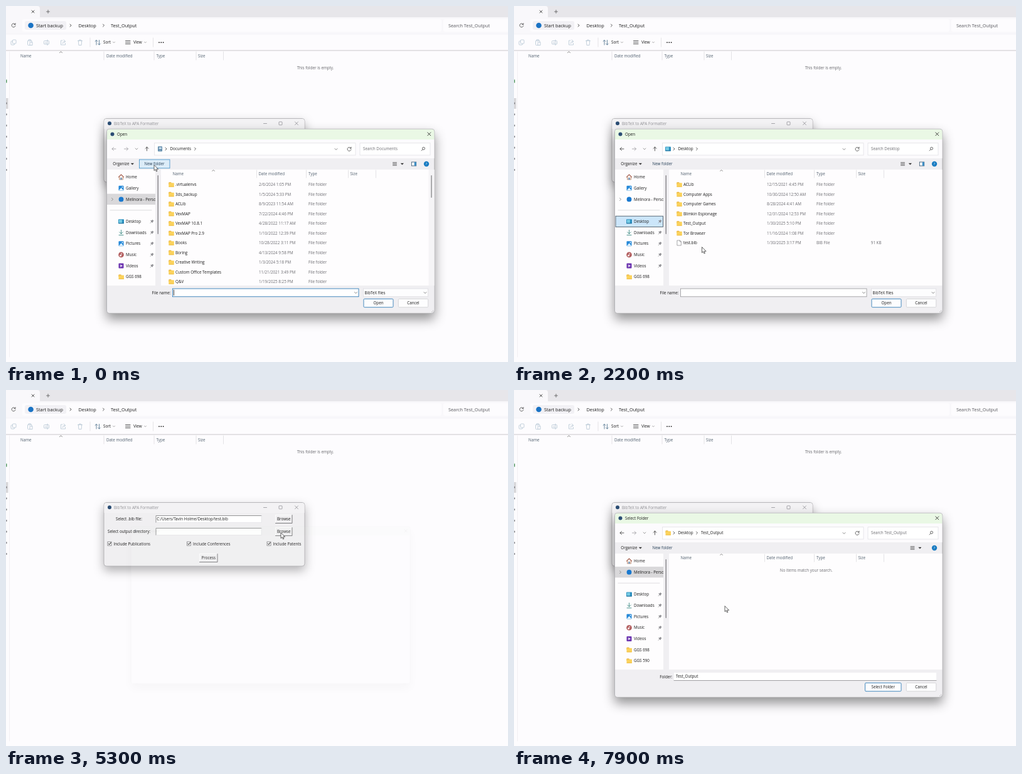
Animation, 800 px wide and 568 px high, one loop 8 s. Source, as an HTML page:

```html
<!DOCTYPE html>
<html lang="en">
<head>
<meta charset="utf-8">
<title>BibTeX to APA Formatter</title>
<style>
html, body { margin: 0; width: 100%; height: 100%; overflow: hidden; background: #fdfcfe; }
svg { display: block; width: 800px; height: 568px; }
text { font-family: "Open Sans", "Noto Sans", sans-serif; white-space: pre; }
.shadow { filter: drop-shadow(0 9px 9px rgba(0,0,0,.42)); }
.soft { filter: drop-shadow(0 7px 8px rgba(0,0,0,.3)); }
</style>
</head>
<body>
<svg viewBox="0 0 800 568">
  <defs><clipPath id="nav"><rect x="161" y="261" width="77" height="185"/></clipPath></defs>
  <g id="explorer"></g><g id="app"></g><g id="dialog"></g><g id="pointer"></g>
</svg>
<script>
const LOOP = 8000, STEP = 100;
const INK = '#1b1b1b', GRAY = '#6d6d72', BLUE = '#1a6fb0';
const byId = id => document.getElementById(id);

// Drawing helpers; text y is the optical middle of the line
const text = (x, y, s, fill = INK, size = 6.27, anchor = 'start') =>
  `<text x="${x}" y="${y + size * .35}" font-size="${size}" fill="${fill}" text-anchor="${anchor}">${s.replace(/&/g, '&amp;')}</text>`;
const mid = (x, y, s, fill, size) => text(x, y, s, fill, size, 'middle');
const rect = (x, y, w, h, fill, stroke = 'none', r = 0, extra = '') =>
  `<rect x="${x}" y="${y}" width="${w}" height="${h}" fill="${fill}" stroke="${stroke}" stroke-width=".8" rx="${r}" ${extra}/>`;
const line = (d, stroke = INK, w = .8, fill = 'none') =>
  `<path d="${d}" fill="${fill}" stroke="${stroke}" stroke-width="${w}" stroke-linecap="round" stroke-linejoin="round"/>`;
const dot = (x, y, r, fill) => `<circle cx="${x}" cy="${y}" r="${r}" fill="${fill}"/>`;
const vline = (x, y1, y2, c = '#dedce0') => line(`M${x} ${y1}V${y2}`, c);
const hline = (x1, x2, y, c = '#dedce0', w) => line(`M${x1} ${y}H${x2}`, c, w);
const right = (x, y, c = '#333') => line(`M${x - 1} ${y - 2}l2 2l-2 2`, c, .8);
const down = (x, y, c = '#555', s = 2) => line(`M${x - s} ${y - s / 2}l${s} ${s}l${s} ${-s}`, c, .7);
const caretDown = (x, y) => line(`M${x - 2} ${y - 1}h4l-2 2z`, '#222', .4, '#222');
const cross = (x, y, c = INK, s = 2.5) => line(`M${x - s} ${y - s}l${2 * s} ${2 * s}m0 ${-2 * s}l${-2 * s} ${2 * s}`, c, .8);
const arrow = (x, y, turn, c) => `<g transform="translate(${x} ${y}) rotate(${turn})">${line('M3 0H-3M-.5 -2.5L-3 0L-.5 2.5', c)}</g>`;
const reload = (x, y) => line(`M${x + 2.7} ${y - 1.6}A3 3 0 1 0 ${x + 3} ${y + .6}M${x + 3} ${y - 3.4}v2h-2`, '#444', .8);

const icons = {
  folder: (x, y) => rect(x - 4, y - 3.8, 4.2, 4, '#e3a92f', 'none', .7) + rect(x - 4, y - 2.8, 8.5, 6.6, '#fbd25c', 'none', .8) + hline(x - 3.6, x + 4, y + 3.2, '#eab840', .7),
  file: (x, y) => line(`M${x - 3} ${y - 4}h4l2 2v6h-6zM${x + 1} ${y - 4}v2h2`, '#858589', .7, '#fff'),
  home: (x, y) => line(`M${x - 3} ${y}v4h6v-4`, '#b98a71', .8, '#f1dfd4') + line(`M${x - 4} ${y}l4 -4l4 4`, '#a7604f', 1.1) + rect(x - 1, y + 1.2, 2, 2.8, '#4d86b8'),
  pictures: (x, y) => rect(x - 4, y - 4, 8, 8, '#2488d8', 'none', 1) + line(`M${x - 3.5} ${y + 3.5}l3.5 -4l3.5 4z`, '#fff', .3, '#e8f6ff') + dot(x + 2, y - 1.8, .9, '#fff'),
  cloud: (x, y) => dot(x, y, 3.9, '#1a79cf'),
  desktop: (x, y) => rect(x - 4.5, y - 3.5, 9, 7, '#2c8fbf', 'none', .8) + rect(x - 3.6, y - 2.7, 5, 5, '#76cbe4') + hline(x - 4, x + 4, y + 2.8, '#1d6792', .8),
  downloads: (x, y) => line(`M${x} ${y - 4}v6m-2.7 -2.7l2.7 2.7l2.7 -2.7M${x - 3.5} ${y + 4}h7`, '#3c8a83', .9),
  music: (x, y) => dot(x, y, 4.3, '#b35f60') + dot(x - 1, y + 1.4, 1.3, '#fff') + line(`M${x + .1} ${y + 1.3}v-3.6l1.5 .8`, '#fff', .7),
  videos: (x, y) => rect(x - 4, y - 4, 8, 8, '#6c35b0', 'none', 1) + line(`M${x - 1} ${y - 1.7}l3 1.7l-3 1.7z`, '#fff', .4, '#fff'),
  documents: (x, y) => rect(x - 3.5, y - 4, 7, 8, '#5d88a8', 'none', .8) + rect(x - 2, y - 2.5, 4.5, 2.5, '#cfe4f1') + hline(x - 2, x + 2, y + 2, '#d8e8f2', .6),
};
const pin = (x, y) => line(`M${x - 2.3} ${y + 2.4}l2 -2M${x - 1.6} ${y - .9}l2.5 2.5l.4 -1.6l1.2 -1l-1.6 -1.6l-1 1.2z`, '#77777c', .7, '#99999e');

const PLACES = [['desktop', 'Desktop'], ['downloads', 'Downloads'], ['pictures', 'Pictures'], ['music', 'Music'], ['videos', 'Videos']];
const DOCUMENTS = [
  ['.virtualenvs', '2/6/2024 1:05 PM'], ['3ds_backup', '1/5/2024 5:33 PM'], ['ACLib', '8/9/2023 11:54 AM'],
  ['VexMAP', '7/22/2024 4:46 PM'], ['VexMAP 10.8.1', '4/28/2022 11:17 AM'], ['VexMAP Pro 2.9', '1/10/2022 12:39 PM'],
  ['Books', '10/28/2022 3:11 PM'], ['Boring', '4/13/2024 9:58 PM'], ['Creative Writing', '1/3/2024 5:18 PM'],
  ['Custom Office Templates', '11/21/2021 3:49 PM'], ['Q&V', '1/19/2025 8:25 PM']];
const DESKTOP = [
  ['ACLib', '12/15/2021 4:45 PM'], ['Computer Apps', '10/30/2024 12:50 AM'], ['Computer Games', '8/28/2024 4:41 AM'],
  ['Blimkin Espionage', '12/31/2024 12:53 PM'], ['Test_Output', '1/30/2025 5:10 PM'], ['Tor Browser', '11/16/2024 1:08 PM']];
const BIB = ['test.bib', '1/30/2025 3:17 PM', 'BIB File', '91 KB'];

function explorer() {
  const faint = '#b5c6d4', head = '#51606e';
  let s = rect(0, 0, 800, 568, '#fdfcfe') + rect(0, 0, 800, 18, '#e7e6ea') + rect(-6, 0, 60, 22, '#f9f8fb', 'none', 4)
    + rect(0, 18, 800, 27, '#f9f8fb') + rect(26, 21, 668, 20, '#fdfcfe', 'none', 3) + rect(697, 21, 110, 20, '#fdfcfe', 'none', 3)
    + cross(43, 9, '#333', 2) + line('M64.5 9h5M67 6.5v5', '#444', .7)
    + reload(12, 31) + rect(30, 24, 66, 14, '#f2f1f5', 'none', 3) + dot(39.5, 31, 4.3, '#1a73c4')
    + text(48, 31, 'Start backup', INK, 7.3) + right(103, 31) + text(115.5, 31, 'Desktop', INK, 7.3) + right(155.5, 31)
    + text(167, 31, 'Test_Output', INK, 7.3) + text(705, 31, 'Search Test_Output', '#55555a', 7.3)
    + hline(0, 800, 45, '#efedf1', .6) + hline(0, 800, 71, '#c9c8cb', 1.2);
  s += rect(8, 56, 5.5, 6, 'none', faint, 1) + rect(10.5, 54, 5.5, 6, '#fdfcfe', faint, 1)
    + rect(34.5, 55, 6.5, 7.5, 'none', faint, 1) + rect(36.3, 53.8, 3, 2, '#fdfcfe', faint) + rect(38, 58, 4, 4.5, '#fdfcfe', faint)
    + rect(60.5, 55.5, 8, 5.5, 'none', faint, 1) + vline(66, 54, 62.5, faint) + mid(63.4, 58.2, 'A', faint, 4)
    + line('M90 55h-2.5v7h7v-2.5M90 60q0 -3.5 4 -3.5M92 54l2.8 2.5l-2.8 2.5', faint)
    + line('M114.5 55.5h7M116.5 55.5v-1.5h3v1.5M115.3 55.5l.6 7h4.2l.6 -7', faint);
  s += vline(134, 51, 65) + line('M144 62v-7.5m-2 2l2 -2l2 2M148.5 54.5v7.5m-2 -2l2 2l2 -2', '#456a86', .8)
    + text(155, 58, 'Sort') + down(172, 58, '#888', 1.5);
  [55.5, 58, 60.5].forEach(y => s += hline(190.5, 198, y, '#333', .8));
  s += text(203, 58, 'View') + down(222, 58, '#888', 1.5) + vline(234.5, 51, 65);
  [244, 247.3, 250.6].forEach(x => s += dot(x, 58.2, .9, '#222'));
  s += line('M85.5 74.5l2 -1.7l2 1.7', '#555', .7);
  [[23, 'Name'], [160, 'Date modified'], [239.5, 'Type'], [306, 'Size']].forEach(([x, n]) => s += text(x, 79.5, n, head));
  [156, 236, 303, 346.5].forEach(x => s += vline(x, 73, 86));
  s += vline(5.5, 73, 560, '#efedf0') + mid(493, 99, 'This folder is empty.', '#66666b')
    + rect(0, 147, 3.5, 17, '#d8d7da') + rect(0, 117.5, 1.5, 5, '#5f9e6c');
  for (let i = 0; i < 7; i++) s += rect(0, 153.8 + i * 17.7, 1.6, 3, '#8d8d92', 'none', .7);
  return s;
}

const bevel = (x, y, w, h, label, sunk) => rect(x, y, w, h, '#f0eff1')
  + line(`M${x} ${y + h}v${-h}h${w}`, sunk ? '#777' : '#fff', .8) + line(`M${x} ${y + h}h${w}v${-h}`, sunk ? '#fff' : '#707073', .9)
  + mid(x + w / 2, y + h / 2, label);
const entry = (y, value) => rect(239, y, 168, 11, '#fff') + line(`M239 ${y + 11}v-11h168`, '#8a898c', .9) + line(`M239 ${y + 11}h168v-11`, '#e3e2e5', .7) + text(240.3, y + 5.5, value);
const check = (x, label) => rect(x, 242.2, 6, 6, '#fff', '#77777a') + line(`M${x + 1.3} 245.2l1.4 1.5l2.3 -3.2`, '#000', 1) + text(x + 9.5, 245.5, label);

function app({ active, path, pressed }) {
  const c = active ? INK : '#929297';
  return rect(156, 179.5, 320, 101.5, '#f0eff1', '#aaa9ac', 4, `class="${active ? 'shadow' : 'soft'}"`)
    + `<path d="M156.4 196v-12.2q0-3.9 3.9-3.9h311.4q3.9 0 3.9 3.9v12.2z" fill="${active ? '#eaf8e5' : '#f3f2f4'}"/>`
    + dot(165, 187.3, 3, '#2b4d74') + text(172, 187.5, 'BibTeX to APA Formatter', c)
    + hline(410.5, 415.5, 187.5, c) + rect(435, 184.8, 5, 5, 'none', c, .6) + cross(463, 187.3, c)
    + mid(196, 206, 'Select .bib file:') + entry(200.5, path) + bevel(429.5, 199.5, 26.5, 13, 'Browse')
    + mid(196, 226, 'Select output directory:') + entry(220.5, '') + bevel(429.5, 219.5, 26.5, 13, 'Browse', pressed)
    + check(162, 'Include Publications') + check(288.5, 'Include Conferences') + check(416, 'Include Patents')
    + bevel(308.5, 261.5, 28.5, 13, 'Process');
}

function navPane(d) {
  const pitch = 17.7;
  let y = 273, s = '';
  const item = (icon, label, x = 191) => { s += icons[icon](183.5, y) + text(x, y, label); y += pitch; };
  item('home', 'Home');
  if (!d.pickFolder) item('pictures', 'Gallery');
  if (d.personal) s += rect(161, y - 8.8, 77, 17.4, '#d9d8da');
  s += right(169.5, y, '#777');
  item('cloud', 'Melinora - Personal');
  s += hline(166, 232, y - .3, '#d5d4d7');
  y += pitch;
  PLACES.forEach(([icon, label], i) => {
    if (!i && d.place === 'hover') s += rect(162, y - 8.7, 76, 17.4, '#e5f2fc');
    if (!i && d.place === 'chosen') s += rect(162, y - 8.6, 75.4, 17.2, '#cce6fa', '#3b4b58');
    s += pin(232.5, y);
    item(icon, label);
  });
  item('folder', 'GGS 698');
  if (d.pickFolder) item('folder', 'GGS 590');
  return `<g clip-path="url(#nav)">${s}</g>`;
}

function fileList(d) {
  let s = line('M328.5 263.3l2 -1.6l2 1.6', '#666', .7);
  [[265.5, 'Name'], [402.5, 'Date modified'], [482, 'Type'], [548.5, 'Size']].forEach(([x, n]) => s += text(x, 268, n, '#51606e'));
  [399.5, 478.5, 545.5, 589.5].forEach(x => s += vline(x, 262, 274));
  d.rows.forEach(([name, date, type = 'File folder', size], i) => {
    const y = 285 + i * 15.5;
    if (i === d.hover) s += rect(257, y - 7, 331, 13.8, '#e6f2fb');
    if (i === d.chosen) s += rect(257, y - 7, 331, 13.8, '#cce6fa');
    s += icons[size ? 'file' : 'folder'](263.3, y) + text(270, y, name)
      + text(403, y, date, GRAY) + text(482, y, type, GRAY) + (size ? text(585.5, y, size, GRAY, 6.27, 'end') : '');
  });
  if (!d.rows.length) s += mid(465.7, 287.5, 'No items match your search.', GRAY);
  return s;
}

const button = (x, w, label, main) => rect(x, 467.3, w, 13.4, '#fdfdfe', main ? BLUE : '#cfced2', 1.5) + mid(x + w / 2, 474, label);

function footer(d) {
  if (d.pickFolder) return text(252.5, 457.5, 'Folder:', INK, 6.27, 'end') + rect(255, 451, 418, 12.5, '#fff')
    + hline(255, 673, 463.5, d.value ? '#8c8b8f' : BLUE, d.value ? .8 : 1.4) + text(258, 457, d.value)
    + button(559.5, 57.5, 'Select Folder', true);
  return text(262.5, 457.5, 'File name:', INK, 6.27, 'end') + rect(265.4, 451, 296.6, 12.8, '#fff', d.focus ? BLUE : '#97969a')
    + text(268, 457, d.value) + (d.blink ? vline(267.5, 453, 461.5, '#111') : '') + down(557.5, 457.5)
    + rect(569.5, 451, 103, 12.8, '#fdfdfe', '#dddbe0') + text(571.5, 457.5, 'BibTeX files') + down(668, 457.5)
    + button(570, 47, 'Open', true);
}

function dialog(d) {
  if (!d) return '';
  let s = rect(160.5, 196.3, 522.3, 294, d.blank ? '#fff' : '#f0eff2', '#a9a9ac', 4, 'class="shadow"')
    + '<path d="M161 213v-12.4q0-3.9 3.9-3.9h313.600h200q3.9 0 3.9 3.9v12.4z" fill="#eaf8e5"/>'
    + dot(169.5, 204.5, 3, '#2b4d74') + text(177, 204.7, d.pickFolder ? 'Select Folder' : 'Open') + cross(674.3, 204.3);
  if (!d.blank) {
    const pale = '#99999e', list = d.pickFolder ? 635 : 619.5;
    s += rect(161, 213, 521.4, 30, '#fcfbfd') + rect(161, 261, 77, 185, '#fefdfe') + rect(247, 261, 435.4, 185, '#fefdfe')
      + arrow(172, 228, 0, d.back ? '#333' : pale) + arrow(191.5, 228, 180, pale) + down(208, 228, '#777') + arrow(224.5, 228, 90, '#333')
      + rect(236.5, 218.7, 320.5, 19.3, '#fff', '#e2e0e5') + icons[d.icon](245.5, 228) + right(255, 228) + text(261.5, 228, d.crumbs[0])
      + right(d.crumbs[0] === 'Documents' ? 301.5 : 291.5, 228) + text(298, 228, d.crumbs[1] || '')
      + down(526, 228.5) + reload(547, 228.5)
      + rect(564, 218.7, 112, 19.3, '#fff', '#e2e0e5') + text(569, 228, 'Search ' + d.crumbs[d.crumbs.length - 1], GRAY)
      + `<circle cx="665.5" cy="227.3" r="2" fill="none" stroke="#444" stroke-width=".8"/>` + line('M664 228.9l-2 2', '#444');
    if (d.newHover) s += rect(212.5, 245, 48.5, 13.8, '#dcecf8', '#3f8fc9');
    s += text(170.3, 252, 'Organize') + caretDown(201.5, 252) + text(220.5, 252, 'New folder', '#263f57');
    [249.8, 252, 254.2].forEach(y => s += hline(list - 3, list + 3, y, '#333', .8));
    s += caretDown(list + 12, 252);
    if (!d.pickFolder) s += rect(646.3, 249, 7.4, 6, '#fff', '#2f4d68') + rect(650.7, 249, 3, 6, '#3d8ec5');
    s += dot(670, 252, 4.2, '#1a7cc2') + mid(670, 252, '?', '#fff', 5.5)
      + navPane(d) + rect(241.5, 270, 1.5, 94, '#8b8a8e', 'none', .7) + fileList(d);
    if (d.rows === DOCUMENTS) s += rect(673.5, 261, 9, 185, '#f5f4f6') + rect(677.3, 270, 1.4, 36, '#8b8a8e', 'none', .7);
    s += rect(161, 446, 521.4, 40, '#f0eff2') + footer(d) + button(625.3, 47.4, 'Cancel');
    [[680.5, 488], [678.5, 488], [680.5, 486]].forEach(([x, y]) => s += dot(x, y, .5, '#999'));
  }
  return `<g opacity="${d.opacity}" transform="translate(422 343) scale(${d.scale}) translate(-422 -343)">${s}</g>`;
}

function dialogAt(t) {
  if (t < 2800) {
    const onDesktop = t >= 1200, picked = t >= 2500, closing = t >= 2700;
    return {
      opacity: closing ? .5 : 1, scale: closing ? .95 : 1,
      icon: onDesktop ? 'desktop' : 'documents', crumbs: [onDesktop ? 'Desktop' : 'Documents'], back: onDesktop,
      rows: onDesktop ? [...DESKTOP, BIB] : DOCUMENTS, chosen: picked ? 6 : -1, hover: t >= 2300 ? 6 : -1,
      personal: !onDesktop, place: onDesktop ? 'chosen' : t >= 600 ? 'hover' : '', newHover: t < 200,
      focus: !onDesktop, blink: !onDesktop && t % 1060 < 530, value: picked ? 'test.bib' : '',
    };
  }
  if (t < 5300) return null;
  const p = Math.min(1, (t - 5280) / 160), inside = t >= 6700, picked = t >= 6400;
  return {
    pickFolder: true, blank: t < 5500, opacity: p ** 1.35, scale: .85 + .15 * p * p,
    icon: inside ? 'folder' : 'desktop', crumbs: inside ? ['Desktop', 'Test_Output'] : ['Desktop'], back: inside,
    rows: inside ? [] : DESKTOP, personal: true, value: picked ? 'Test_Output' : '',
    chosen: picked ? 4 : -1, hover: t >= 6200 ? 4 : t >= 5900 ? 5 : -1,
  };
}

const PATH = [[0, 236, 254], [200, 236, 254], [700, 213, 348], [1400, 213, 348], [2200, 299.5, 385], [2400, 287, 377],
  [2700, 287, 377], [3100, 309, 334], [3600, 410, 246], [4200, 438, 228], [5500, 438, 228], [6000, 301.5, 365],
  [6300, 292, 347], [7000, 292, 347], [7500, 336, 345], [8000, 336, 345]];

function pointerAt(t) {
  const i = PATH.findIndex(k => k[0] > t), [t0, x0, y0] = PATH[i - 1], [t1, x1, y1] = PATH[i];
  const u = (t - t0) / (t1 - t0), e = u * u * (3 - 2 * u);
  return [x0 + (x1 - x0) * e, y0 + (y1 - y0) * e];
}

const ARROW = line('M0 0V8.6L2 6.8L3.5 10L4.9 9.4L3.5 6.300H6.200Z', '#222', .7, '#fff');
const HAND = line('M.7 .5Q1.700 -.3 2.300 .8V4.500L6.100 5.300Q7 5.600 6.900 6.800L6.300 9.500V11.500H2L-1.500 7.500Q-1.700 6.200 -.4 6.400L.7 7.300Z', '#222', .8, '#fff');

function update(id, markup) {
  const node = byId(id);
  if (node.markup !== markup) node.innerHTML = node.markup = markup;
}

function render(now) {
  const t = Math.floor((now % LOOP) / STEP) * STEP;
  update('app', app({
    active: t >= 2700 && t < 5300, path: t >= 2700 ? 'C:/Users/Tavin Holme/Desktop/test.bib' : '', pressed: t === 5100,
  }));
  update('dialog', dialog(dialogAt(t)));
  const [x, y] = pointerAt(t);
  update('pointer', `<g transform="translate(${x} ${y})">${t >= 500 && t < 1600 ? HAND : ARROW}</g>`);
}

update('explorer', explorer());
const start = performance.now();
function tick() {
  render(performance.now() - start);
  requestAnimationFrame(tick);
}
tick();
</script>
</body>
</html>
```
